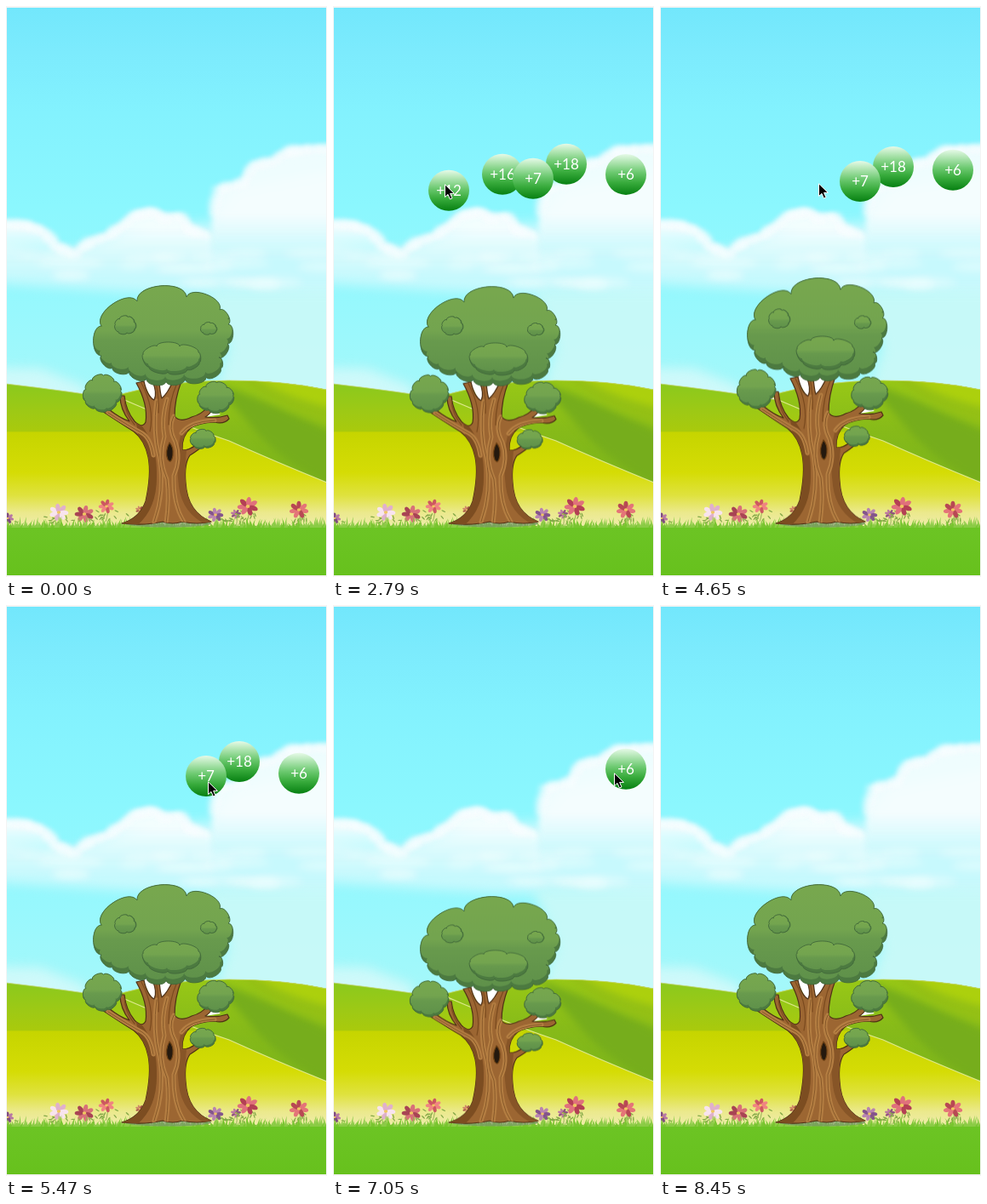
Animation, 377 px wide and 671 px high, one loop 8.9 s. Source, as an HTML page with a canvas:

```html
<!DOCTYPE html>
<html lang="en">
<head>
<meta charset="utf-8">
<title>Tree and energy bubbles</title>
<style>
html, body { margin: 0; width: 100%; height: 100%; overflow: hidden; background: #fff; }
canvas { display: block; }
</style>
</head>
<body>
<canvas id="stage" width="377" height="671"></canvas>
<script>
const W = 377, H = 671, LOOP = 8900, FLIGHT = 500, GROUND = 610;
const stage = document.getElementById('stage').getContext('2d');
const clamp = v => Math.max(0, Math.min(1, v));
const ease = v => v * v * (3 - 2 * v);

let seed = 7;
const rand = () => (seed = (seed * 16807) % 2147483647) / 2147483647;

function layer(draw) {
  const c = document.createElement('canvas');
  c.width = W;
  c.height = H;
  draw(c.getContext('2d'));
  return c;
}

function gradient(g, y0, y1, stops) {
  const grad = g.createLinearGradient(0, y0, 0, y1);
  for (const [at, color] of stops) grad.addColorStop(at, color);
  return grad;
}

function shape(g, d, fill, stroke, width = 1) {
  const p = new Path2D(d);
  if (fill) { g.fillStyle = fill; g.fill(p); }
  if (stroke) { g.strokeStyle = stroke; g.lineWidth = width; g.stroke(p); }
}

function ellipse(g, x, y, rx, ry, fill, angle = 0) {
  g.fillStyle = fill;
  g.beginPath();
  g.ellipse(x, y, rx, ry, angle, 0, 7);
  g.fill();
}

// Closed outline whose edges bulge outwards as round lobes (points run clockwise)
function scallop(pts, bulge) {
  const p = new Path2D();
  pts.forEach(([x, y], i) => {
    const [u, v] = pts[(i + 1) % pts.length];
    const nx = (v - y) * bulge, ny = (x - u) * bulge;
    if (!i) p.moveTo(x, y);
    p.bezierCurveTo(x + nx, y + ny, u + nx, v + ny, u, v);
  });
  return p;
}

function foliage(g, path, top, bottom, lift) {
  g.save();
  g.fillStyle = '#4c7a40';
  g.fill(path);
  g.clip(path);
  g.translate(-1, -lift);
  g.fillStyle = gradient(g, top, bottom, [[0, '#78a84e'], [0.5, '#73a44f'], [0.6, '#689a4d'], [1, '#5f914a']]);
  g.fill(path);
  g.restore();
  g.strokeStyle = '#41683a';
  g.lineWidth = 0.9;
  g.stroke(path);
}

function tuft(g, x, y, rx, ry, n, lift) {
  const pts = [];
  for (let i = 0; i < n; i++) {
    const a = i / n * Math.PI * 2 - 2.2, k = i % 2 ? 0.9 : 0.82;
    pts.push([x + Math.cos(a) * rx * k, y + Math.sin(a) * ry * k]);
  }
  foliage(g, scallop(pts, 0.33), y - ry, y + ry, lift);
}

function flower(g, x, y, r, color, core) {
  for (let i = 0; i < 10; i++) {
    const a = rand() * 3 + 0.1, d = 6 + rand() * 10;
    ellipse(g, x + Math.cos(a) * d, y + 3 + Math.sin(a) * d * 0.9, 2.6, 0.7, '#84a848', a + rand());
  }
  shape(g, `M${x},${y}Q${x + 3},${y + 8} ${x - 1},${y + 18}`, null, '#7fa344', 0.8);
  for (let i = 0; i < 7; i++) {
    const a = i / 7 * Math.PI * 2 + x;
    ellipse(g, x + Math.cos(a) * r * 0.58, y + Math.sin(a) * r * 0.48, r * 0.45, r * 0.24, i % 3 ? color : core, a);
  }
  ellipse(g, x, y, r * 0.2, r * 0.16, '#f0c860');
}

// Soft cloud with small puffs along its upper edge
function cloud(g, edge, bottom, color) {
  const d = 'M' + edge.map(p => p.join()).join('L') + `V${bottom}H${edge[0][0]}Z`;
  g.filter = 'blur(3px)';
  shape(g, d, gradient(g, edge[0][1] - 40, bottom, [[0, color], [0.45, color], [1, 'rgba(235,252,254,0)']]));
  edge.slice(1).forEach(([x, y], i) => {
    const [u, v] = edge[i];
    for (let k = 0; k < 1; k += 0.25)
      ellipse(g, u + (x - u) * k, v + (y - v) * k + 3, 4 + rand() * 5, 3 + rand() * 4, 'rgba(250,254,255,.7)');
  });
}

const scene = layer(g => {
  g.fillStyle = '#f4f4f4';
  g.fillRect(0, 0, W, H);
  g.beginPath();
  g.rect(1, 2, 375, 667);
  g.clip();

  g.fillStyle = gradient(g, 0, 450, [[0, '#72e7fc'], [0.12, '#7cebfd'], [0.28, '#83f2fe'], [0.52, '#8bf7fe'], [0.8, '#98f8fd'], [1, '#a4f8fa']]);
  g.fillRect(0, 0, W, 460);

  // Clouds
  g.filter = 'blur(7px)';
  shape(g, 'M-20,275L60,292 120,275 175,255 240,255 270,215 400,190V345L290,340 190,338 100,333 -20,325Z', 'rgba(208,250,253,.85)');
  shape(g, 'M-20,425L40,426 95,448 90,480H-20Z', 'rgba(220,250,250,.75)');
  shape(g, 'M235,335H400V470H240L262,400Z', 'rgba(206,249,247,.85)');
  cloud(g, [[-10, 252], [22, 254], [45, 262], [60, 280], [80, 289], [97, 275], [118, 268], [135, 256], [152, 243], [172, 239], [186, 247], [205, 244], [216, 260], [242, 268]], 318, 'rgba(250,254,254,.92)');
  cloud(g, [[242, 240], [250, 212], [278, 205], [290, 184], [312, 180], [332, 168], [360, 165], [390, 164]], 300, 'rgba(248,253,254,.92)');
  g.filter = 'blur(5px)';
  for (let i = 0; i < 22; i++)
    ellipse(g, rand() * W, 290 + rand() * 38, 16 + rand() * 24, 3 + rand() * 4, 'rgba(244,254,254,.45)');
  g.filter = 'none';

  // Fields
  shape(g, 'M0,444Q70,452 145,464L377,520V620H0Z', gradient(g, 444, 612, [
    [0, '#8bc91d'], [0.21, '#9fc914'], [0.33, '#a9ca0c'], [0.34, '#c6d500'], [0.62, '#d5dc05'], [0.78, '#dfe23e'], [0.9, '#ebe98c'], [1, '#efecab']]));
  shape(g, 'M0,444Q70,452 145,464', null, '#c4d67a', 0.8);
  const hill = 'M128,458Q190,440 262,440Q325,440 377,451V560Q315,535 262,511Q205,492 128,458Z';
  shape(g, hill, gradient(g, 440, 560, [[0, '#98c816'], [0.5, '#86ba19'], [1, '#7cb51b']]));
  g.save();
  g.clip(new Path2D(hill));
  g.filter = 'blur(4px)';
  shape(g, 'M240,440Q300,462 390,505V570Q320,535 285,490Z', '#76ad1c');
  shape(g, 'M272,434Q305,466 390,496V430Z', '#94c015');
  shape(g, 'M290,434Q325,460 390,474V430Z', '#acd00d');
  g.restore();
  shape(g, 'M128,458Q205,492 262,511Q315,535 377,560', null, '#dfe98c', 1.2);
  shape(g, 'M128,458Q190,440 262,440Q325,440 377,451', null, '#c8d870', 0.8);

  // Flowers and grass
  flower(g, 2, 602, 7, '#b878a4', '#7f4a80');
  flower(g, 62, 595, 11, '#f8e4ee', '#e0b0cc');
  flower(g, 92, 597, 11, '#d87078', '#a84454');
  flower(g, 118, 588, 9, '#f08480', '#cc5860');
  flower(g, 157, 592, 5, '#d08868', '#a85848');
  flower(g, 246, 598, 9, '#b884b0', '#84548c');
  flower(g, 270, 597, 6, '#bc78a0', '#905480');
  flower(g, 284, 588, 12, '#e0707c', '#b44054');
  flower(g, 344, 592, 11, '#e47478', '#b84854');
  g.fillStyle = gradient(g, 604, 669, [[0, '#7fc832'], [0.15, '#6cc424'], [1, '#67c11d']]);
  g.fillRect(0, 611, W, 60);
  for (let x = 0; x < W; x += 2) {
    const h = 3 + rand() * 10, lean = rand() * 8 - 4;
    shape(g, `M${x - 1.5},613Q${x},${612 - h / 2} ${x + lean},${612 - h}Q${x + 1},${612 - h / 2} ${x + 2},613Z`, rand() < 0.5 ? '#78c52f' : '#8acb45');
  }
});

const tree = layer(g => {
  g.lineJoin = g.lineCap = 'round';
  ellipse(g, 190, 608, 51, 4.5, 'rgba(120,150,110,.7)');
  shape(g, 'M160,440H203L198,462 188,465 172,464Z M228,484L238,470 252,480Z', '#fff');
  const trunk = 'M136,608Q157,602 164,582Q171,550 167,530Q163,510 150,500Q134,490 113,476L121,474Q133,484 145,488Q134,474 134,458L139,458Q141,476 151,488Q160,497 164,489Q167,468 153,443L162,441Q166,459 174,463Q178,455 172,441L180,441Q181,455 183,461Q190,455 196,441L206,441Q198,462 198,482Q204,490 218,483Q230,480 238,470L244,473Q238,481 234,483Q248,485 260,481L262,485Q256,492 245,489Q226,490 217,496Q206,505 207,522Q216,522 224,515L229,519Q221,525 216,528Q209,538 211,560Q213,595 241,606Q224,610 207,606Q196,610 184,606Q164,611 136,608Z';
  shape(g, trunk, '#9c6632', '#4e3015', 1.2);
  g.save();
  g.clip(new Path2D(trunk));
  shape(g, 'M152,484Q178,512 177,550Q178,592 152,612H130Q158,598 164,560Z', '#7c4d21');
  shape(g, 'M206,500Q198,530 203,565Q207,596 236,610L244,606Q214,592 213,560Q208,530 216,500Z', '#875527');
  const bark = ['M177,464Q172,500 180,530Q187,570 174,606', 'M189,462Q182,486 186,506Q178,532 189,556Q192,580 188,608', 'M197,482Q190,496 199,512Q206,532 197,552Q196,586 209,606', 'M120,478Q145,494 160,502Q170,508 173,528', 'M245,487Q216,488 206,502'];
  for (const d of bark) {
    shape(g, d, null, '#b47e42', 5);
    shape(g, d, null, '#875829', 1);
  }
  shape(g, 'M159,443Q175,473 169,500 M176,443Q180,460 179,478 M201,443Q191,465 191,492 M139,462Q140,479 151,492', null, '#7a4a1e', 1.2);
  g.restore();
  shape(g, 'M192,513Q186,524 190,533Q194,539 196,528Q197,518 192,513Z', '#24190e', '#704416', 1.2);

  tuft(g, 113, 455, 24, 23, 9, 3);
  tuft(g, 246, 460, 23, 19, 9, 3);
  tuft(g, 231, 509, 17, 11, 7, 2);
  const crown = scallop([[112, 376], [154, 347], [212, 342], [251, 357], [261, 374], [260, 397], [250, 413], [252, 426], [235, 436], [210, 438], [188, 441], [165, 438], [145, 429], [125, 425], [112, 411]], 0.36);
  foliage(g, crown, 330, 445, 6);
  foliage(g, scallop([[161, 409], [177, 400], [204, 400], [226, 407], [227, 419], [213, 427], [190, 430], [168, 424]], 0.25), 395, 434, 4);
  tuft(g, 140, 375, 14, 11, 7, 0);
  tuft(g, 238, 379, 11, 7, 7, 0);
});

// label, x, middle y, bob size, bob period, bob phase, click time
const bubbles = [
  ['+6', 90, 193, 2.9, 2400, 0.05, 1650],
  ['+12', 136, 217.3, 2.9, 2400, 0.05, 3020],
  ['+16', 199, 198.3, 2.9, 2400, 0.05, 3940],
  ['+18', 274, 186.3, 2.9, 2400, 0.05, 6480],
  ['+7', 235, 203.3, 2.9, 2400, 0.05, 5550],
  ['+6', 344, 196.1, 3.5, 1150, 0.85, 7150]
];

// time, x, y
const moves = [
  [510, 313, 396], [660, 313, 396], [870, 208, 328], [1020, 208, 328],
  [1560, 86, 199], [2050, 86, 199], [2750, 132, 209], [3680, 132, 209],
  [3930, 187, 208], [5080, 187, 208], [5440, 238, 207], [5750, 238, 207],
  [6350, 274, 201], [6560, 274, 201], [6980, 331, 197], [7950, 331, 197], [8200, 335, 198]
];

function drawBubble([label, x, mid, size, period, phase, click], t) {
  const fly = clamp((t - click) / FLIGHT);
  const pop = ease(clamp((t - 1020) / 400));
  if (!pop || fly === 1) return;
  const y = mid + size * Math.cos(2 * Math.PI * ((Math.min(t, click) - 2000) / period - phase));
  stage.save();
  stage.translate(x + (187 - x) * fly, y + (335 - y) * fly);
  stage.scale(pop * (1 - 0.16 * fly), pop * (1 - 0.16 * fly));
  stage.globalAlpha = pop * clamp((1 - fly) * 5);
  ellipse(stage, 0, 0, 24, 24, gradient(stage, -24, 24, [[0, '#e6fae8'], [0.2, '#b0e5b2'], [0.45, '#6cc970'], [0.7, '#38ab3c'], [1, '#078012']]));
  stage.fillStyle = '#fff';
  stage.font = '17px Lato, sans-serif';
  stage.textAlign = 'center';
  stage.fillText(label, 0, 6);
  stage.restore();
}

function drawCursor(t) {
  if (t < 510 || t >= 8450) return;
  const i = moves.findIndex(m => m[0] > t);
  const b = moves[i < 0 ? moves.length - 1 : i], a = i < 0 ? b : moves[i - 1];
  const k = a === b ? 0 : ease((t - a[0]) / (b[0] - a[0]));
  stage.save();
  stage.translate(a[1] + (b[1] - a[1]) * k - 1, a[2] + (b[2] - a[2]) * k);
  shape(stage, 'M.5,.8V15.6L4,12.4 6.4,18 9,16.9 6.6,11.4H11.4Z', '#000', '#fff');
  stage.restore();
}

// Damped vertical wobble after each bubble lands
function treeScale(t) {
  let s = 1;
  for (const b of bubbles) {
    const d = t - b[6] - FLIGHT;
    if (d > 0 && d < 800) s -= 0.0616 * Math.exp(-d / 600) * (1 - d / 800) * Math.sin(2 * Math.PI * d / 280);
  }
  return s;
}

function frame(t) {
  stage.drawImage(scene, 0, 0);
  stage.save();
  stage.translate(0, GROUND);
  stage.scale(1, treeScale(t));
  stage.drawImage(tree, 0, -GROUND);
  stage.restore();
  for (const b of bubbles) drawBubble(b, t);
  drawCursor(t);
}

const start = performance.now();
function tick() {
  frame((performance.now() - start) % LOOP);
  requestAnimationFrame(tick);
}
tick();
</script>
</body>
</html>
```
